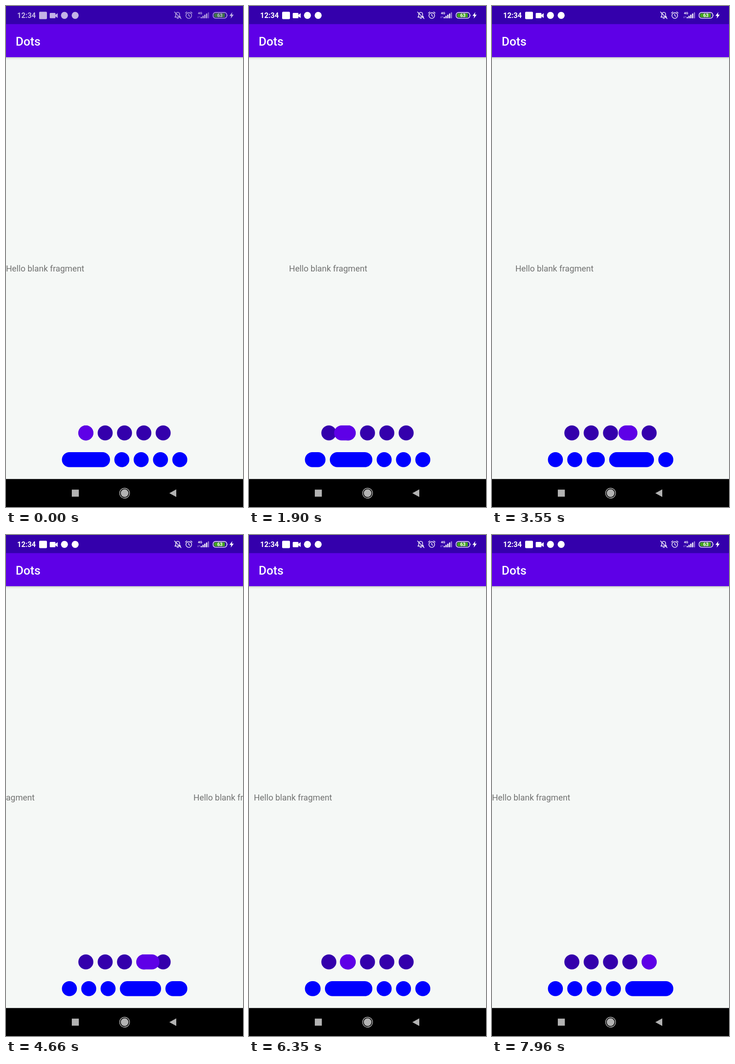
An HTML page for the animation above (8000 ms loop, 515 by 1087 pixels).

```html
<!DOCTYPE html>
<html lang="en">
<head>
<meta charset="utf-8">
<title>Dots</title>
<style>
  html, body { margin: 0; width: 100%; height: 100%; overflow: hidden; background: #f5f8f6; }
  svg { display: block; width: 515px; height: 1087px; font-family: Roboto, sans-serif; }
</style>
</head>
<body>
<svg viewBox="0 0 515 1087">
  <defs>
    <linearGradient id="shade" x1="0" y1="0" x2="0" y2="1">
      <stop offset="0" stop-color="#000" stop-opacity=".22"/>
      <stop offset=".4" stop-color="#000" stop-opacity=".07"/>
      <stop offset="1" stop-color="#000" stop-opacity="0"/>
    </linearGradient>
  </defs>
  <rect width="515" height="1087" fill="#f5f8f6"/>
  <g id="pages" font-size="18.36" fill="#717271"></g>
  <rect y="111" width="515" height="6" fill="url(#shade)"/>
  <rect y="39" width="515" height="72" fill="#5e00e7"/>
  <rect width="515" height="39.3" fill="#3400ac"/>
  <text x="21" y="85.5" font-size="26" font-weight="500" fill="#fff">Dots</text>

  <g id="status" fill="#fff">
    <text x="24.3" y="26.3" font-size="15.7" font-weight="700">12:34</text>
    <rect x="72" y="12.5" width="17" height="16" rx="2"/>
    <rect x="95" y="15" width="12.5" height="11.5" rx="1.5"/>
    <path d="M107 19.5 112.3 15.6V26L107 22.2Z"/>
    <circle cx="127" cy="20.3" r="7.6"/>
    <circle cx="150.3" cy="20.3" r="7.6"/>
    <g fill="none" stroke="#fff" stroke-width="1.4" stroke-linecap="round" stroke-linejoin="round">
      <path d="M367 24.2H379.2L377.3 21.5V18Q377.3 14 373.2 13.6 369 14 368.9 18V21.5ZM371.5 26.8H375M366.2 13 380.5 27.5"/>
      <circle cx="397.2" cy="20.7" r="6.2"/>
      <path d="M397.2 17.5V21L399.6 22.3M390 15.2 393 12.7M404.4 15.2 401.4 12.7"/>
    </g>
    <text x="417" y="18" font-size="7.5" font-weight="700">4G</text>
    <path d="M417.3 22V26M416 24.6 417.3 26.2M420 26V22M420 22 421.2 23.4" fill="none" stroke="#fff" stroke-width=".8" opacity=".6"/>
    <g id="bars"></g>
    <rect x="450" y="14" width="29.8" height="12.6" rx="5.2" fill="none" stroke="#fff" stroke-width="1.4"/>
    <path d="M455 15.8H475.5V24.8H455Q452 24.8 452 21.8V18.8Q452 15.8 455 15.8Z" fill="#43a51f"/>
    <path d="M480.8 18.2Q482.6 20.3 480.8 22.4Z"/>
    <text x="464.8" y="24" font-size="10" font-weight="700" text-anchor="middle">63</text>
    <path d="M491.8 13.2 485.6 21.4H489.4L488.4 27.2 494.8 18.8H490.8Z"/>
  </g>

  <g id="worm"></g>
  <g id="pills" fill="#00f"></g>

  <rect y="1026.3" width="515" height="61" fill="#000"/>
  <g fill="#b3b3b3">
    <rect x="143" y="1049.3" width="15.3" height="15.3"/>
    <circle cx="257.7" cy="1057" r="8.4"/>
    <circle cx="257.7" cy="1057" r="10.8" fill="none" stroke="#b3b3b3" stroke-width="1.4"/>
    <path d="M355 1057 370 1048.7V1065.3Z"/>
  </g>
</svg>
<script>
const LOOP = 8000, WIDTH = 515, COUNT = 5;
const SIZE = 32.6, STEP = 42, GROW = 71.9;
// swipes: start, duration, from page, to page
const SWIPES = [
  [1480, 720, 0, 1], [2840, 390, 1, 2], [3240, 470, 2, 3], [3760, 480, 3, 4],
  [4430, 421, 4, 3], [4870, 370, 3, 2], [5250, 380, 2, 1], [5640, 380, 1, 0],
  [6030, 397, 0, 1], [6480, 440, 1, 2], [6960, 440, 2, 3], [7440, 460, 3, 4]
];

const el = id => document.getElementById(id);
const clamp = v => Math.min(1, Math.max(0, v));
const ease = u => 1 - (1 - u ** 1.5) ** 3;

function add(parent, tag, attrs) {
  const node = document.createElementNS('http://www.w3.org/2000/svg', tag);
  for (const k in attrs) node.setAttribute(k, attrs[k]);
  return parent.appendChild(node);
}

function addPill(parent, x, y, fill) {
  return add(parent, 'rect', { x, y, width: SIZE, height: SIZE, rx: SIZE / 2, fill });
}

function place(node, x, width) {
  node.setAttribute('x', x);
  node.setAttribute('width', width);
}

const labels = [], pills = [];
const wormLeft = i => 157.2 + STEP * i;
for (let i = 0; i < COUNT; i++) {
  const label = add(el('pages'), 'text', { y: 576 });
  label.textContent = 'Hello blank fragment';
  labels.push(label);
  addPill(el('worm'), wormLeft(i), 910, '#3400ac');
  pills.push(addPill(el('pills'), 0, 968, '#00f'));
  const h = 3 + i * 2.5;
  add(el('bars'), 'rect', { x: 423 + i * 3.9, y: 26.8 - h, width: 2.6, height: h, rx: .8, opacity: i === 4 ? .5 : 1 });
}
const worm = addPill(el('worm'), 0, 910, '#5e00e7');

function pageAt(t) {
  let page = 0;
  for (const [start, length, from, to] of SWIPES) {
    if (t >= start) page = from + (to - from) * ease(clamp((t - start) / length));
  }
  return page;
}

function draw(t) {
  const page = pageAt(t);
  labels.forEach((label, i) => label.setAttribute('x', (i - page) * WIDTH));

  // head moves in the first half of a swipe, tail in the second
  const base = Math.floor(page), part = page - base;
  const tail = wormLeft(base + clamp(part * 2 - 1));
  const head = wormLeft(base + clamp(part * 2)) + SIZE;
  place(worm, tail, head - tail);

  let x = 121.5;
  pills.forEach((pill, i) => {
    const width = SIZE + GROW * clamp(1 - Math.abs(i - page));
    place(pill, x, width);
    x += width + STEP - SIZE;
  });

  el('status').setAttribute('opacity', .7 + .3 * clamp((t - 540) / 450));
}

const begin = performance.now();
function tick() {
  draw((performance.now() - begin) % LOOP);
  requestAnimationFrame(tick);
}
tick();
</script>
</body>
</html>
```
